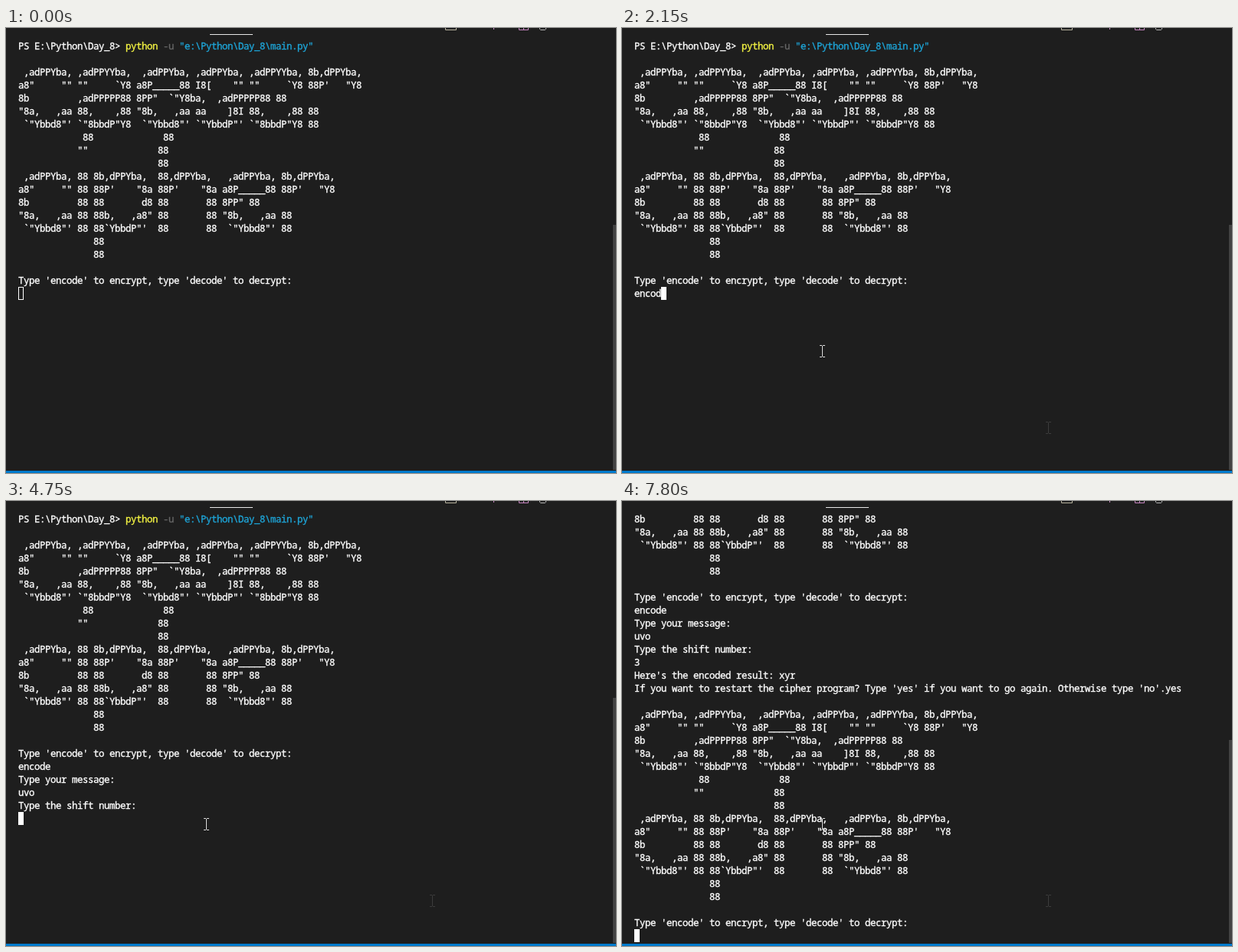
These frames come from a looping animation (796 by 581 pixels, 8000 ms). An HTML page:

```html
<!DOCTYPE html>
<html lang="en">
<head>
<meta charset="utf-8">
<title>Cipher in a terminal</title>
<style>
  html, body { margin: 0; width: 100%; height: 100%; overflow: hidden; background: #1e1e1e; }
  svg { display: block; width: 100%; height: 100%; }
  text {
    font: 12.3px "Noto Sans Mono", "DejaVu Sans Mono", monospace;
    letter-spacing: calc(7px - 1ch);
    white-space: pre; font-variant-ligatures: none;
    color: #fff;
  }
  text, tspan { fill: currentColor; stroke: currentColor; stroke-width: .35px; }
  .command { color: #f5f543; }
  .flag { color: #666; }
  .string { color: #1ea5d8; }
  .beam { fill: none; stroke-width: 1; }
</style>
</head>
<body>
<svg viewBox="0 0 796 581">
  <rect width="796" height="581" fill="#1e1e1e"/>
  <!-- panel header, cut off by the top edge -->
  <rect x="266" y="8" width="56" height="1" fill="#e7e7e7"/>
  <g fill="none">
    <path d="M573.5 0V2.5H587.5V0" stroke="#b9b4a0"/>
    <path d="M636.5 0V2" stroke="#c586c0"/>
    <path d="M669.5 0V2.5H681.5V0M675.5 0V2.5" stroke="#c586c0"/>
    <path d="M696.5 0V1.5L697.5 2.5H703.5L704.5 1.5V0" stroke="#b5b5b5"/>
  </g>
  <rect id="thumb" x="792" width="4" fill="#434343"/>
  <rect y="578" width="796" height="3" fill="#007acc"/>
  <text id="prompt" x="16">PS E:\Python\Day_8&gt; <tspan class="command">python</tspan> <tspan class="flag">-u</tspan> <tspan class="string">"e:\Python\Day_8\main.py"</tspan></text>
  <g id="rows"></g>
  <rect id="caret" stroke="#fff"/>
  <path id="trail" class="beam" stroke="#3c3c3c"/>
  <path id="mouse" class="beam" stroke="#dcdcdc"/>
</svg>

<script type="text/plain" id="logo">
 ,adPPYba, ,adPPYYba,  ,adPPYba, ,adPPYba, ,adPPYYba, 8b,dPPYba,
a8"     "" ""     `Y8 a8P_____88 I8[    "" ""     `Y8 88P'   "Y8
8b         ,adPPPPP88 8PP"  `"Y8ba,  ,adPPPPP88 88
"8a,   ,aa 88,    ,88 "8b,   ,aa aa    ]8I 88,    ,88 88
 `"Ybbd8"' `"8bbdP"Y8  `"Ybbd8"' `"YbbdP"' `"8bbdP"Y8 88
            88             88
           ""             88
                          88
 ,adPPYba, 88 8b,dPPYba,  88,dPPYba,   ,adPPYba, 8b,dPPYba,
a8"     "" 88 88P'    "8a 88P'    "8a a8P_____88 88P'   "Y8
8b         88 88       d8 88       88 8PP" 88
"8a,   ,aa 88 88b,   ,a8" 88       88 "8b,   ,aa 88
 `"Ybbd8"' 88 88`YbbdP"'  88       88  `"Ybbd8"' 88
              88
              88
</script>

<script>
const $ = id => document.getElementById(id);
const LOOP = 8000, ROWS = 33, CELL_W = 7, CELL_H = 17, LEFT = 16, TOP = 15;
const BASELINE = 13, TRACK = 562, HISTORY = 58;

const intro = "\n" + $("logo").textContent + "\nType 'encode' to encrypt, type 'decode' to decrypt:\n";

// Everything written to the terminal, with the time it appears
const output = [
  [0, intro],
  [1430, "e"], [1550, "n"], [1820, "c"], [2020, "o"], [2150, "d"], [2420, "e"],
  [2490, "\n"], [2560, "Type your message:\n"],
  [3950, "u"], [4080, "v"], [4290, "o"],
  [4680, "\n"], [4750, "Type the shift number:\n"],
  [5740, "3"],
  [5940, "\nHere's the encoded result: xyr\nIf you want to restart the cipher program? " +
         "Type 'yes' if you want to go again. Otherwise type 'no'."],
  [7270, "y"], [7400, "e"], [7670, "s"],
  [7800, intro]
];

const FOCUS = 690, APPEAR = 70, JUMP = 140, GLIDE = 330, STEP = 70, STEPS = 5;
const start = [556.5, 522], middle = [292.5, 463], rest = [261.5, 422];

const rows = Array.from({ length: ROWS }, (_, i) => {
  const row = document.createElementNS("http://www.w3.org/2000/svg", "text");
  row.setAttribute("x", LEFT);
  row.setAttribute("y", TOP + i * CELL_H + BASELINE);
  return $("rows").appendChild(row);
});

function set(id, attrs) {
  for (const name in attrs) $(id).setAttribute(name, attrs[name]);
}

const beam = "M-3.5 -7.5h3m1 0h3M0 -7V7M-3.5 7.5h3m1 0h3";
set("mouse", { d: beam });
set("trail", { d: beam, transform: `translate(${start})` });

function mouseAt(t) {
  if (t < JUMP) return start;
  if (t < GLIDE) return middle;
  const k = Math.min(1, (Math.floor((t - GLIDE) / STEP) + 1) / STEPS);
  const eased = 1 - (1 - k) ** 2;
  return middle.map((m, i) => Math.round((rest[i] - m) * eased) + m);
}

function drawCaret(col, row, focused) {
  const x = LEFT + col * CELL_W, y = TOP + row * CELL_H;
  set("caret", { x: x + .5, y: y + .5, width: CELL_W - 1, height: CELL_H - 1, fill: focused ? "#fff" : "none" });
}

function draw(t) {
  const lines = output.filter(([at]) => at <= t).map(([, s]) => s).join("").split("\n");
  const scroll = Math.max(0, lines.length - ROWS);
  rows.forEach((row, i) => {
    const line = lines[i + scroll] || "";
    if (row.textContent !== line) row.textContent = line;
  });
  set("prompt", { y: TOP + BASELINE - scroll * CELL_H });
  drawCaret(lines[lines.length - 1].length, lines.length - 1 - scroll, t >= FOCUS);

  const height = Math.round(TRACK * ROWS / (HISTORY + scroll));
  set("thumb", { y: TOP + TRACK - height, height });

  set("trail", { visibility: t >= JUMP ? "visible" : "hidden" });
  set("mouse", { visibility: t >= APPEAR ? "visible" : "hidden", transform: `translate(${mouseAt(t)})` });
}

function frame() {
  draw(performance.now() % LOOP);
  requestAnimationFrame(frame);
}
frame();
</script>
</body>
</html>
```
